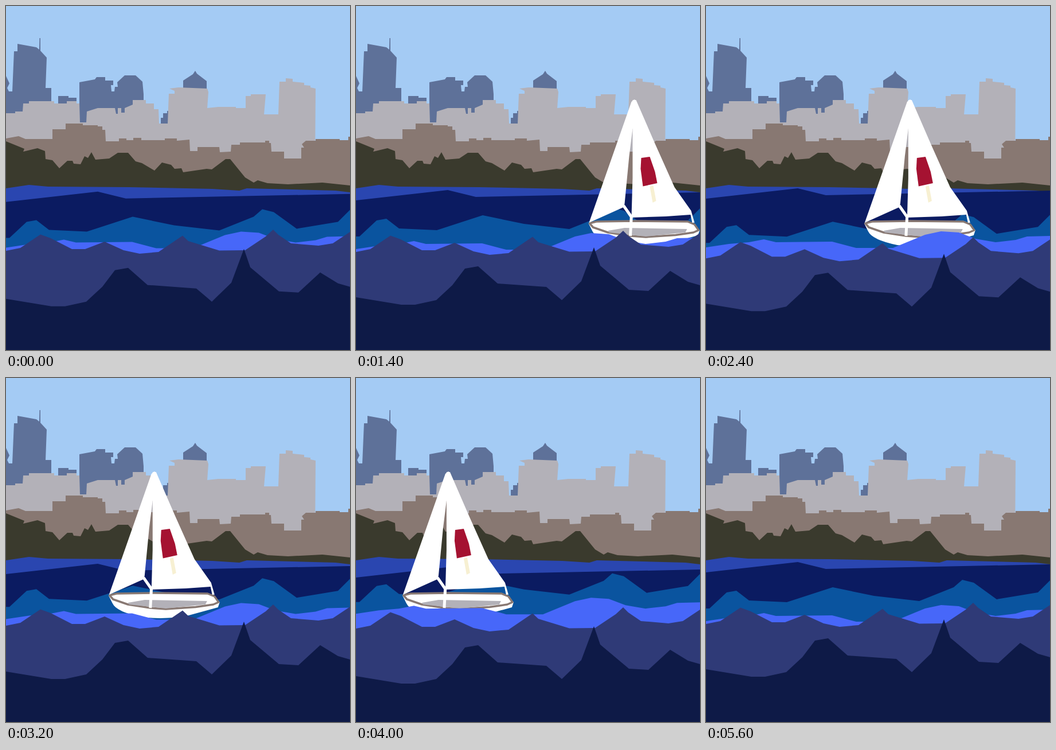
An HTML page that plays this animation: 600x600 px, repeating every 5800 ms.

```html
<!DOCTYPE html>
<html lang="en">
<head>
<meta charset="utf-8">
<title>Sailing past the city</title>
<style>
  html, body { margin: 0; width: 100%; height: 100%; overflow: hidden; background: #a4cbf4; }
  svg { display: block; width: 100vw; height: 100vh; }
</style>
</head>
<body>
<svg viewBox="0 0 600 600">
  <!-- far towers -->
  <g fill="#5e7199">
    <path d="M0 122L6 135L2 143L5 149H11L14 79H20V66L53 72L58 76L58.5 56H60V78L71 90L69 143H79V200H0Z"/>
    <path d="M91 180V157H109V160H123V180Z"/>
    <path d="M128 203V133L155 128L158 124H173V130H187V138H183L184 149H189L190 141H195L194 133L207 121H226L238 132L240 154V203Z"/>
    <path d="M270 205V195H274V187H281V183H290V205Z"/>
    <path d="M309 150V130L326 119L330 113L333 118L350 131V150Z"/>
  </g>

  <!-- middle blocks -->
  <path fill="#b3b1b8" d="M0 187H16V184H29L30 170H40V166H84V170H106V166H123V170H128L129 203H140L141 184L160 178H190L192 188H195V178H201V186H207V178L221 172V164H244V170H258V180H266L267 205H282L284 153H294V148L285 144L301 142L351 144L353 150L351 178L370 176H401V178H418V157H427V154H453L450 189H475L477 132H488V126L500 127V132L520 134V138L531 139V142L540 144L539 280H0Z"/>

  <!-- near blocks -->
  <path fill="#887872" d="M0 231L22 227L34 232H81V215H104V205H134V208H160V210H168V216H173L174 236H197V231H210V234H222V230H236V234H277V231H298V235L320 233L321 253H334V246H372L373 255L392 254L393 242H408V238H452V235H459V239H462L463 254H485V266H515V247H520L516 241L523 235H540V232H582V234H597V228H600V330H0Z"/>

  <!-- trees and far water -->
  <path fill="#3a3a2d" d="M0 236L32 249L30 254L55 248L68 253L69 267L81 269L93 283L107 270H116L118 275L130 276L137 262L143 265L149 255L156 268L180 266L195 256H213L226 271L237 274L259 287L272 273L288 277L294 284L306 283L309 290L350 284L359 285L383 267H391L417 299L432 308L439 304L456 309L492 311L552 308L600 313V345H0Z"/>
  <path fill="#2a46b0" d="M0 318L40 312L73 315L215 316L360 319L407 322L420 318L575 322L600 325V360H0Z"/>

  <path id="navy" fill="#0b1b61" d="M0 339L160 321L209 333L600 325V640H0Z"/>
  <path id="teal" fill="#0a549f" d="M0 402H6L36 374L53 371L75 388L141 391L221 365L293 380L372 389L432 365L447 352L467 357L507 386L579 374L600 353V640H0Z"/>

  <g id="boat" fill="#fff">
    <path d="M-80 379L-66 375H93L114 391L111 400L60 414Q20 422 -22 417Q-66 408 -73 393Z"/>
    <path stroke="#887872" stroke-width="3.5" stroke-linejoin="round" d="M-78 379L-66 376L0 375L93 376L105 381L112 391L103 395L72 399.5L20 403L-7 401L-46 395L-72 386Z"/>
    <path fill="#b3b1b8" d="M-46 392L-17 387L92 389L89 395L20 402L-44 395Z"/>
    <path d="M-5 167L0 163L3 165L1 214H-3L-9 262L-17 345L-19 351L-79 378Z"/>
    <path d="M-3 164L3 164L36 240L70 316L99 357L105 378H101L98 364L55 367L-5 369L-3 300Z"/>
    <path d="M-19 348L-5 368M-5 364L-7 401" fill="none" stroke="#fff" stroke-width="5"/>
    <path fill="#f7f0d2" d="M27 315L33 313L38 340L32 343Z"/>
    <path fill="#a51231" d="M12 265L27 263L36 289L40 309L15 314.5L11 284Z"/>
  </g>

  <path id="bright" fill="#4767f9" d="M0 424L40 418L75 415L101 410L122 415L220 414L262 425H326L382 402L410 396L441 398L470 409L505 415L540 411L560 405L600 404V640H0Z"/>
  <path id="dusk" fill="#2f3a77" d="M0 429L25 424L60 400.5L78 407L115 426H138L172 413L205 428L233 434L266 431L308 402.5L318 412L372 428.5L417 428L453 404L466 392L475 401L497 416L545 420L570 416L600 396V640H0Z"/>
  <path id="front" fill="#0e1a47" d="M0 508L79 521H103L140 513L168 487L190 458L213 454L247 484L332 490L359 513L393 480L415 421L426 453L476 495L510 497L548 462L579 481L600 487V640H0Z"/>
</svg>
<script>
const LOOP = 5800, STEP = 200;
const MIDDLE = 3, SWELL = 1.6; // seconds: boat at centre stage, length of one swell

// Height of each successive swell; sag is where a layer rests before the last one.
const LAYERS = {
  navy:   { peaks: [11, -4, 12, 6], sag: 0 },
  teal:   { peaks: [10, 15, -11, -6], sag: -12 },
  bright: { peaks: [-10, -4, -14, -5], sag: -9.5 },
  dusk:   { peaks: [-8, 15, 12, -2], sag: -4.5 },
  front:  { peaks: [10.5, 15, 16, 16], sag: 0 }
};

const mix = (a, b, k) => a + (b - a) * k;

// Nearly steady in the middle, rushing in and out at the edges.
const boatX = t => 283 - 121.3 * t - 0.8 * t ** 5;

// Swells passed so far; the last one is quicker.
const swells = t => 2 + (t < SWELL ? t / SWELL : 1 + t - SWELL);

function waveY({ peaks, sag }, n) {
  const i = Math.min(Math.floor(n), peaks.length - 1);
  const rest = k => (k === peaks.length - 1 ? sag : 0);
  const f = 2 * (n - i);
  return f < 1 ? mix(rest(i), peaks[i], f) : mix(peaks[i], rest(i + 1), f - 1);
}

function move(id, x, y) {
  document.getElementById(id).setAttribute("transform", `translate(${x} ${y})`);
}

function draw(time) {
  const t = Math.floor((time % LOOP) / STEP) * STEP / 1000 - MIDDLE;
  move("boat", boatX(t), 0);
  for (const id in LAYERS) move(id, 0, waveY(LAYERS[id], swells(t)));
}

const start = performance.now();
function tick() {
  draw(performance.now() - start);
  requestAnimationFrame(tick);
}
tick();
</script>
</body>
</html>
```
